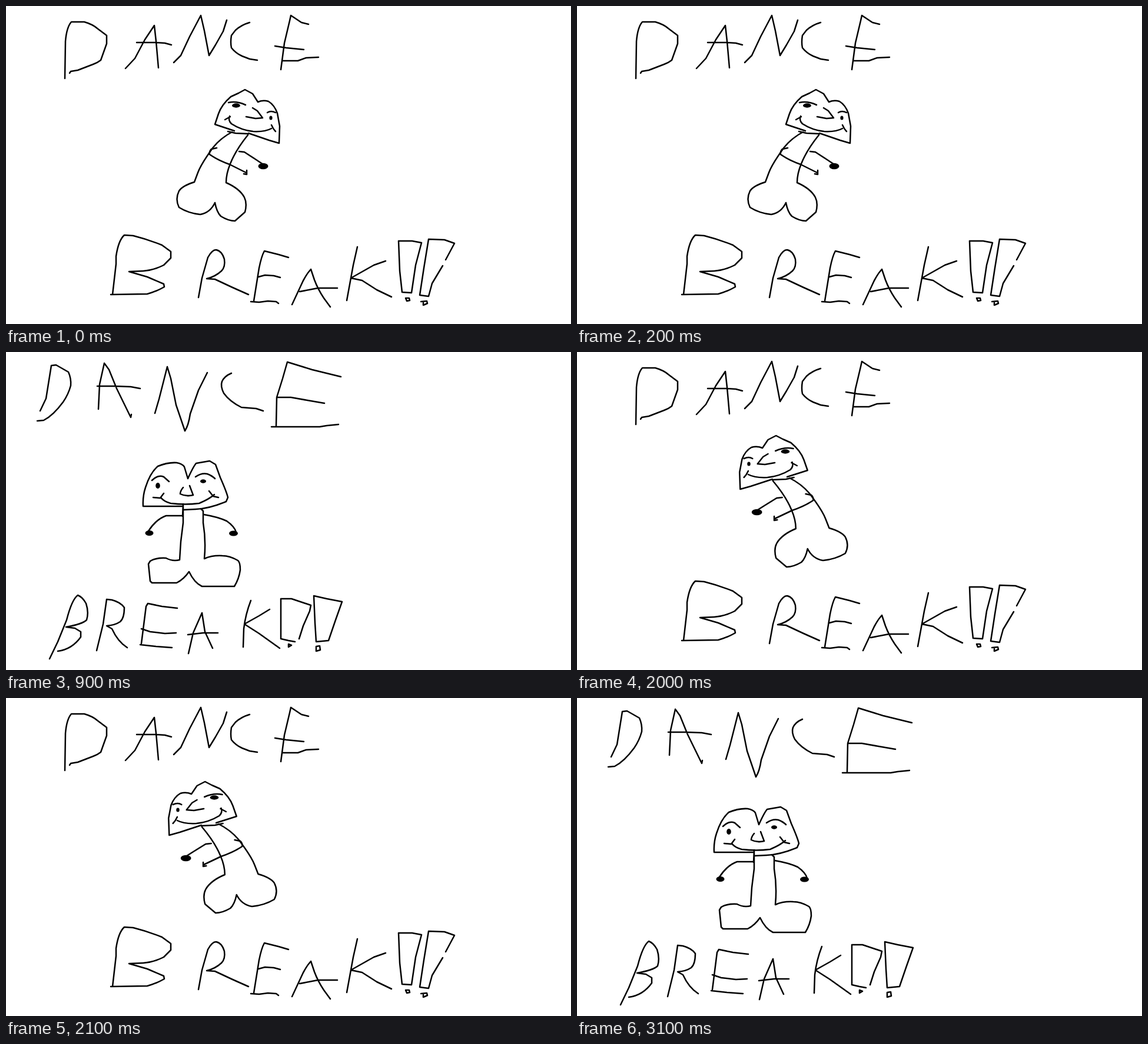
An HTML page that plays this animation: 960x540 px, repeating every 4.1 s.

```html
<!DOCTYPE html>
<html lang="en">
<head>
<meta charset="utf-8">
<title>Dance break</title>
<style>
  html, body { margin: 0; width: 100%; height: 100%; overflow: hidden; background: #fff; }
  svg { display: block; width: 100%; height: 100%; }
  path { fill: none; stroke: #000; stroke-width: 2.5; stroke-linecap: round; stroke-linejoin: round; vector-effect: non-scaling-stroke; }
  .dot { fill: #000; stroke: none; }
</style>
</head>
<body>
<svg viewBox="0 0 960 540">
  <g id="leanWords" role="img" aria-label="DANCE BREAK!!">
    <path d="M100 123L101 60Q103 36 111 27L133 27Q147 31 155 38L171 50V64L161 92Q156 96 148 99L122 109L110 111L108 114"/>
    <path d="M203 106L219 89L236 57L252 33L255 60L259 105M222 62L255 62L270 63L281 66"/>
    <path d="M285 96L297 84L312 52L331 16L337 42L345 84L356 66L369 43L375 24"/>
    <path d="M414 28Q400 32 390 41L383 50Q381 62 383 71Q390 80 401 85L414 90L427 92"/>
    <path d="M514 31L502 28L484 16L482 25L473 63L467 108M457 68L476 71L506 74M469 93L496 93L510 88L531 87"/>
    <path d="M181 490L187 438V425Q191 398 201 389L216 390Q240 396 265 406L280 417V428L268 440Q250 449 233 450L209 451L240 460L268 472L269 477Q255 485 240 489L178 490"/>
    <path d="M327 495L333 462L343 427Q350 414 357 414Q367 416 371 430Q373 443 366 450Q355 460 341 463L355 464L385 478L412 490"/>
    <path d="M480 427L463 422L439 416Q434 425 430 445L421 501M429 460L440 457L455 458L466 461M416 502L430 503L445 501L459 502L463 505"/>
    <path d="M486 507L500 477Q508 458 518 447L524 465Q530 481 540 496L551 511M499 485L530 479L563 479"/>
    <path d="M597 409L590 440L579 500M645 433L625 440L586 462L605 466L630 482L655 494"/>
    <path d="M667 399L690 399L706 402L696 440L689 487L673 486L669 450ZM679 496L685 496L686 500L681 501Z"/>
    <path d="M747 431L762 403L745 397L718 396L710 445L703 491L718 493L724 471L742 441M705 502L715 501L716 505L709 508L709 504"/>
  </g>
  <g id="lean">
    <path d="M388 212L373 207L355 201L361 183Q366 168 382 154L395 148L406 142L419 149L428 163Q437 159 446 162Q456 168 461 182L465 204L464 233L447 228L412 216M377 213L390 216L412 217"/>
    <path d="M378 164Q392 161 407 168M444 181Q450 177 458 181M419 173L427 178L436 190L424 191L408 188"/>
    <path d="M372 193L381 188M380 187Q377 194 383 200Q400 211 420 213Q440 214 451 208M451 202Q454 209 458 213"/>
    <path d="M384 214Q365 224 352 240Q331 269 326 283L320 299Q300 305 294 314Q287 328 294 342Q310 352 330 354Q347 351 355 334Q358 350 365 357Q378 365 389 365L406 350Q410 335 405 325Q397 310 374 300Q374 285 381 268Q390 245 411 219"/>
    <path d="M358 241L349 243Q345 247 346 252Q360 262 380 269L408 283M404 285L409 286L409 279M396 247L405 248L425 261L437 269"/>
    <ellipse class="dot" cx="391" cy="169" rx="7" ry="3.7"/>
    <ellipse class="dot" cx="450" cy="190" rx="2.6" ry="3.5"/>
    <ellipse class="dot" cx="437" cy="272" rx="8.5" ry="5.2"/>
  </g>
  <g id="front" role="img" aria-label="DANCE BREAK!!">
    <path d="M58 100L68 79L77 23L85 22L106 34Q111 45 110 57Q106 72 97 85Q80 108 64 116L53 117"/>
    <path d="M157 97L159 55L167 19L175 30L188 62L212 111L213 106M155 58L185 58L212 59L228 62"/>
    <path d="M253 104L260 80L274 25L280 45L289 90L304 134Q310 125 313 105L327 65L342 35"/>
    <path d="M383 36Q371 41 367 50Q364 58 370 70Q380 84 400 94L425 96L437 100"/>
    <path d="M569 42L520 30L478 17L470 45L460 77L459 126M460 77L484 77L512 82L541 87M451 127L533 127L545 125L565 123"/>
    <path d="M74 521L88 492L103 455Q112 420 122 413Q130 416 136 427Q141 442 137 455Q130 462 102 467L117 469L127 475V484Q112 505 88 508"/>
    <path d="M154 507L165 462L171 420L180 421Q195 425 201 434Q201 452 194 458Q185 464 171 465L180 470Q190 492 206 502"/>
    <path d="M291 435L265 432L241 427L238 432L230 495M230 470L245 475L270 478L289 477M228 497L255 500L282 502"/>
    <path d="M310 512L318 477L333 443L338 475L351 503M309 480L335 477L360 477"/>
    <path d="M416 422Q407 445 404 470L403 501M448 437L430 448L405 462L430 478L465 503"/>
    <path d="M491 492L480 490L467 487V419L485 419L518 430L516 440L505 465L498 487M480 496L485 498L480 501Z"/>
    <path d="M523 414L545 419L571 424L560 455L548 490L527 492L525 460ZM527 500L533 499L534 506L527 508Z"/>

    <path d="M300 262H233Q232 245 237 230Q245 205 258 194Q275 187 290 188Q300 190 303 195L309 215Q318 195 323 189L346 185L356 191L364 213Q375 238 377 247L374 254Q345 266 322 267L301 268"/>
    <path d="M248 218Q258 208 268 212L277 220M322 212Q332 205 342 207Q350 210 355 215M301 230Q296 236 296 241Q306 246 318 243L312 227"/>
    <path d="M250 247L262 248L268 240M263 247Q268 254 280 257Q305 260 328 257Q345 250 354 242M345 236L352 245L361 247"/>
    <path d="M300 279L301 258L301 290L297 322L295 353Q283 356 272 350Q255 349 245 355L242 360L245 389L248 392H290Q302 386 311 373Q320 392 333 398H388Q396 385 398 370Q398 357 394 354Q380 346 368 346Q350 345 337 351Q340 320 335 290V270L331 266"/>
    <path d="M300 278H272Q255 284 242 304M336 276Q360 280 375 287Q388 296 391 306"/>
    <ellipse class="dot" cx="258" cy="227" rx="3.8" ry="5"/>
    <ellipse class="dot" cx="335" cy="219.500" rx="5" ry="3.2"/>
    <ellipse class="dot" cx="243.500" cy="307.500" rx="7" ry="4.500"/>
    <ellipse class="dot" cx="386.500" cy="308" rx="7.500" ry="4.500"/>
  </g>
</svg>
<script>
  const LOOP = 4100;
  const MIRROR = "matrix(-1.05 0 0 1 764.5 0)";
  const [leanWords, lean, front] = ["leanWords", "lean", "front"].map(id => document.getElementById(id));
  const show = (el, on) => el.setAttribute("visibility", on ? "visible" : "hidden");

  // Poses switch hard: lean right, front, lean left, front.
  function draw(t) {
    const facing = (t >= 900 && t < 2000) || t >= 3000;
    show(front, facing);
    show(leanWords, !facing);
    show(lean, !facing);
    lean.setAttribute("transform", t < 2000 ? "" : MIRROR);
  }

  const start = performance.now();
  function tick() {
    draw((performance.now() - start) % LOOP);
    requestAnimationFrame(tick);
  }
  tick();
</script>
</body>
</html>
```
